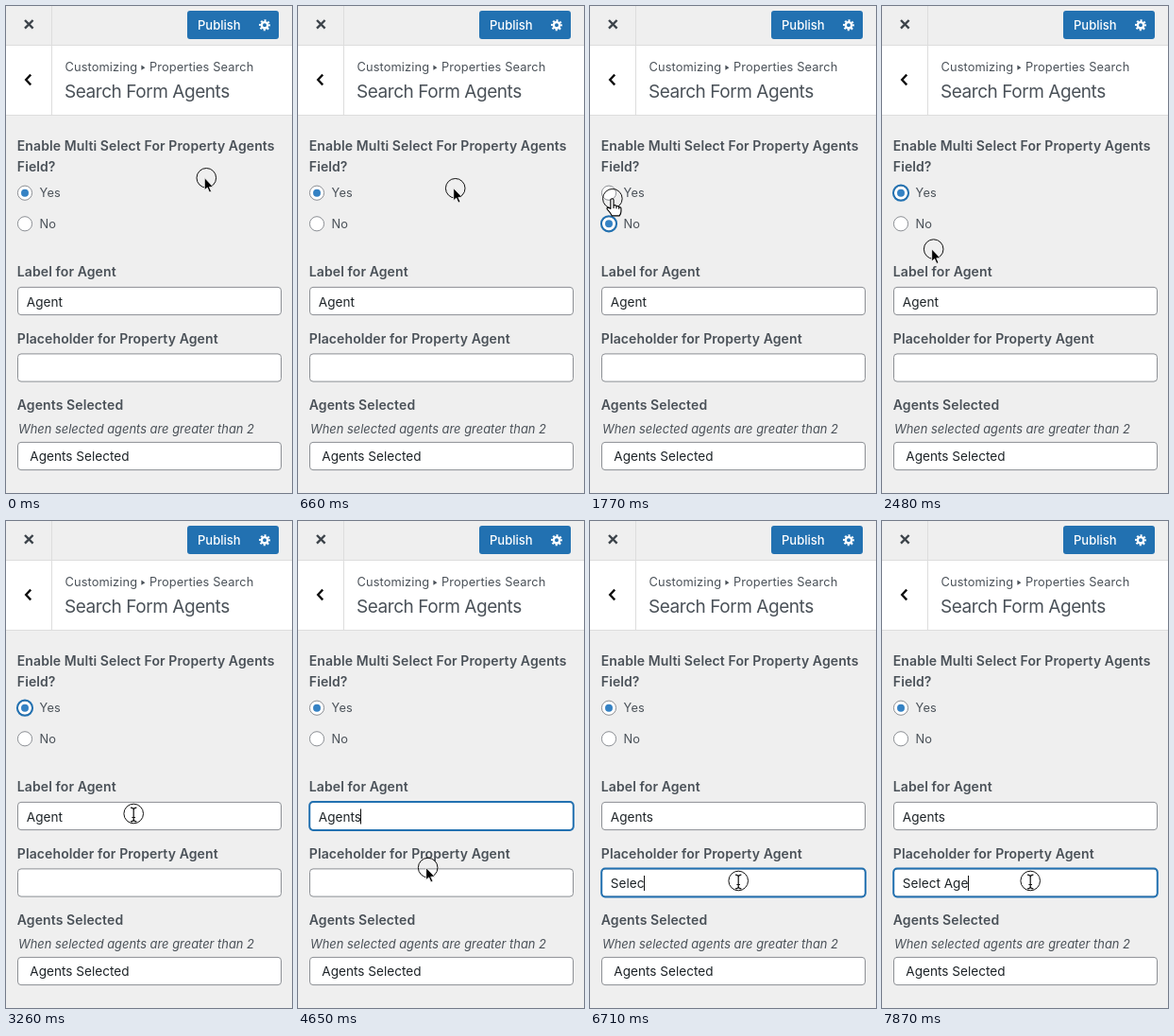
Write an HTML page that moves like this. It is 303 px wide and 515 px high and loops after 8000 ms.

```html
<!DOCTYPE html>
<html lang="en">
<head>
<meta charset="utf-8">
<title>Search Form Agents</title>
<style>
  html, body { margin: 0; width: 100%; height: 100%; overflow: hidden; background: #efefef; }
  svg { display: block; width: 303px; height: 515px; }
  text { font-family: Inter, Roboto, sans-serif; fill: #4a5158; white-space: pre; }
  .label { font-size: 14px; font-weight: 600; letter-spacing: .1px; }
  .crumb, .option { font-size: 12.8px; letter-spacing: .12px; }
  .title { font-size: 19px; letter-spacing: -.45px; }
  .note { font-size: 12.9px; font-style: italic; }
  .value { font-size: 13.6px; fill: #1d2327; }
  .publish { font-size: 13px; font-weight: 500; fill: #fff; }
  .field, .radio { fill: #fff; stroke: #8c8f94; }
  .focus { fill: none; stroke: #2271b1; stroke-width: 2; opacity: 0; }
  .dot { fill: #3582c4; }
  .caret { fill: #111; }
</style>
</head>
<body>
<svg viewBox="0 0 303 515">
  <path fill="#efefef" d="M0 0h303v515H0z"/>
  <path fill="#fff" d="M0 42h303v73H0z"/>
  <path fill="none" stroke="#ddd" d="M0 41.5h303M0 115.5h303M48.5 0v115"/>
  <path fill="none" stroke="#3c434a" stroke-width="2.4" d="M20 15l8.6 8.6M28.6 15l-8.6 8.6"/>
  <path fill="none" stroke="#111" stroke-width="2.4" d="M26.2 72.6l-5 5.4 5 5.4"/>

  <rect x="192" y="5" width="97" height="30" rx="3" fill="#2271b1"/>
  <text class="publish" x="203" y="25">Publish</text>
  <g transform="translate(274 20.3)" fill="none" stroke="#fff">
    <circle r="3.2" stroke-width="2.4"/>
    <circle r="5" stroke-width="2" stroke-dasharray="1.96 1.96" transform="rotate(-11)"/>
  </g>

  <text class="crumb" x="62.5" y="69">Customizing</text>
  <path fill="#4a5158" d="M143.4 62.6l4 2.6-4 2.6z"/>
  <text class="crumb" x="152" y="69">Properties Search</text>
  <text class="title" x="62" y="97">Search Form Agents</text>

  <text class="label" x="11.8" y="153">Enable Multi Select For Property Agents</text>
  <text class="label" x="11.8" y="175">Field?</text>
  <text class="option" x="35.6" y="202">Yes</text>
  <text class="option" x="35.6" y="235">No</text>
  <g id="yes" transform="translate(20 197.7)"><circle class="radio" r="7.6"/><circle class="focus" r="8.1"/><circle class="dot" r="4"/></g>
  <g id="no" transform="translate(20 230.3)"><circle class="radio" r="7.6"/><circle class="focus" r="8.1"/><circle class="dot" r="4"/></g>

  <text class="label" x="11.8" y="286">Label for Agent</text>
  <g id="name" transform="translate(12.5 297.4)">
    <rect class="field" width="279" height="29.2" rx="3.5"/><rect class="focus" x="-.3" y="-.3" width="279.6" height="29.8" rx="3.8"/>
    <text class="value" x="9.3" y="20.2"></text><path class="caret" d="M0 7h1v16h-1z"/>
  </g>
  <text class="label" x="11.8" y="356.5">Placeholder for Property Agent</text>
  <g id="hint" transform="translate(12.5 367.9)">
    <rect class="field" width="279" height="29.2" rx="3.5"/><rect class="focus" x="-.3" y="-.3" width="279.6" height="29.8" rx="3.8"/>
    <text class="value" x="9.3" y="20.2"></text><path class="caret" d="M0 7h1v16h-1z"/>
  </g>
  <text class="label" x="11.8" y="427">Agents Selected</text>
  <text class="note" x="13" y="452">When selected agents are greater than 2</text>
  <rect class="field" x="12.5" y="461.4" width="279" height="29.2" rx="3.5"/>
  <text class="value" x="25.3" y="481.4">Agents Selected</text>

  <g id="cursor">
    <circle r="10.3" fill="none" stroke="#111"/>
    <path id="arrow" fill="#000" stroke="#fff" stroke-width=".8" d="M-2-.2v13.2l3-2.7 2.2 5 2.1-.9-2.2-4.8h4.2z"/>
    <path id="hand" fill="#fff" stroke="#000" stroke-width="1.1" stroke-linejoin="round" transform="translate(.5 1.2)"
      d="M-2.5 9.8V.4a1.6 1.6 0 0 1 3.2 0V6q2.6-.9 2.9.8 2.4-.7 2.7 1 2.3-.4 2.3 1.7V12q0 2.6-1.8 4.9H-1.2Q-2.8 13.4-6 10.2q-1-1.7.7-2 1.4 0 2.8 1.6M.7 6v3M3.6 6.8v2.4M6.3 7.8v2"/>
    <g id="beam" fill="none">
      <path stroke="#fff" stroke-width="2.6" d="M0-4.5v11"/>
      <path stroke="#111" stroke-width="1.2" d="M-3.2-6.3Q0-6.3 0-4 0-6.3 3.2-6.3M0-4V6M-3.2 8.3Q0 8.3 0 6 0 8.3 3.2 8.3M-1.8 4h3.6"/>
    </g>
  </g>
</svg>
<script>
const LOOP = 8000;
const $ = id => document.getElementById(id);
const part = (id, name) => $(id).querySelector(name);

const easeInOut = u => u < .5 ? 2 * u * u : 1 - 2 * (1 - u) ** 2;
const easeIn = u => u ** 1.4;
const easeOut = u => 1 - (1 - u) ** 2;

// start, end, x, y, easing
const moves = [
  [0, 0, 212.3, 181.8],
  [390, 1170, 23.5, 227.2, easeInOut],
  [1630, 1860, 24, 193.7, easeInOut],
  [2370, 2480, 54.4, 256.8, easeIn],
  [2480, 2820, 101.5, 309.5, easeOut],
  [3140, 3260, 135.2, 309.5, easeInOut],
  [4480, 4650, 137.5, 366.5, easeIn],
  [4650, 4900, 157.2, 380.5, easeOut]
];

// time, text, caret shown
const nameKeys = [[0, 'Agent', 0], [3710, 'Agent', 1], [4210, 'Agents', 1], [4740, 'Agents', 0]];
const hintKeys = [
  [0, '', 0], [5260, '', 1], [5910, 'S', 1], [6320, 'Sele', 1], [6470, 'Sele', 0], [6710, 'Selec', 1],
  [7040, 'Select', 1], [7220, 'Select ', 1], [7610, 'Select A', 1], [7740, 'Select Ag', 1], [7870, 'Select Age', 1]
];

function place(t) {
  let [, , x, y] = moves[0];
  for (const [a, b, nx, ny, ease] of moves.slice(1)) {
    if (t < a) break;
    const k = ease(Math.min(1, (t - a) / (b - a)));
    x += (nx - x) * k;
    y += (ny - y) * k;
  }
  return [x, y];
}

function pointer(x, y) {
  const within = (a, b) => y >= a && y <= b;
  if (within(297, 327) || within(368, 397)) return 'beam';
  if (x < 58 && (within(188, 208) || within(220, 240))) return 'hand';
  return 'arrow';
}

// Half strength for one short step, then full
const step = (t, a, b) => t < a ? 0 : t < b ? .5 : 1;
const focus = (id, v) => part(id, '.focus').style.opacity = v;
const show = (el, on) => el.style.visibility = on ? 'visible' : 'hidden';

function type(id, keys, t) {
  const [, value, caretOn] = keys.filter(k => k[0] <= t).pop();
  const text = part(id, 'text'), caret = part(id, '.caret');
  if (text.textContent !== value) text.textContent = value;
  const end = 9.3 + (value ? text.getComputedTextLength() : 0);
  caret.setAttribute('transform', `translate(${Math.round(end) - .5} 0)`);
  show(caret, caretOn);
}

function draw(t) {
  const noChosen = t >= 1430 && t < 2370;
  show(part('no', '.dot'), noChosen);
  show(part('yes', '.dot'), !noChosen);
  const yesFocus = step(t, 2370, 2400), nameFocus = step(t, 3710, 3800), hintFocus = step(t, 5260, 5340);
  focus('no', step(t, 1430, 1460) - yesFocus);
  focus('yes', yesFocus - nameFocus);
  focus('name', nameFocus - hintFocus);
  focus('hint', hintFocus);
  type('name', nameKeys, t);
  type('hint', hintKeys, t);

  const [x, y] = place(t);
  const kind = pointer(x, y);
  $('cursor').setAttribute('transform', `translate(${x} ${y})`);
  for (const id of ['arrow', 'hand', 'beam']) show($(id), id === kind);
}

const start = performance.now();
function tick() {
  draw((performance.now() - start) % LOOP);
  requestAnimationFrame(tick);
}
tick();
</script>
</body>
</html>
```
